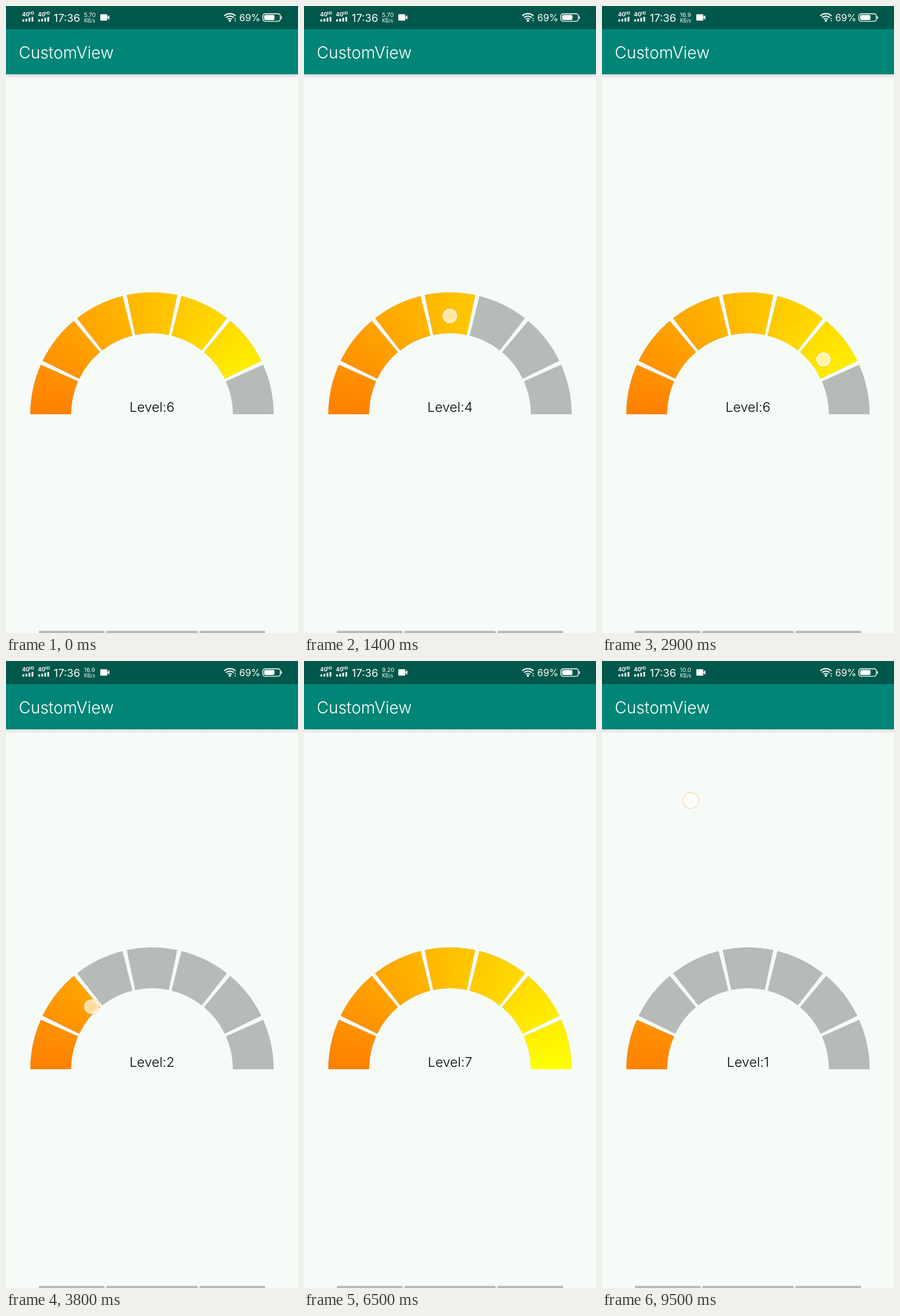
An HTML page that plays this animation: 480 by 1029 pixels, repeating every 9.6 s.

```html
<!DOCTYPE html>
<html lang="en">
<head>
<meta charset="utf-8">
<title>CustomView</title>
<style>
  html, body { margin: 0; width: 100%; height: 100%; overflow: hidden; background: #f6fbf8; }
  #stage { position: relative; width: 480px; height: 1029px; overflow: hidden; }
  svg { position: absolute; left: 0; top: 0; display: block; }
  text { font-family: Inter, Roboto, sans-serif; }
  #lit {
    position: absolute; left: 40px; top: 470px; width: 400px; height: 200px;
    background: conic-gradient(from 270deg at 200px 200px, #ff8000 0deg, #ffff00 180deg, #ff8000 180deg);
  }
</style>
</head>
<body>
<div id="stage">
  <svg width="480" height="1029" viewBox="0 0 480 1029">
    <defs>
      <linearGradient id="shade" x2="0" y2="1">
        <stop offset="0" stop-color="#000" stop-opacity=".13"/>
        <stop offset="1" stop-color="#000" stop-opacity="0"/>
      </linearGradient>
      <g id="signal" fill="#fff">
        <text x="0" y="17" font-size="8.5" font-weight="700">4G</text>
        <text x="11.5" y="14.3" font-size="5.6" font-weight="700">HD</text>
        <path d="M.5 25.5v-3.5h3v3.5zM5.5 25.5v-4.5h3v4.5zM10.5 25.5v-6h3v6zM15.5 25.5v-7.5h3v7.5z"/>
      </g>
    </defs>
    <rect width="480" height="1029" fill="#f6fbf8"/>
    <rect y="112" width="480" height="7" fill="url(#shade)"/>
    <rect y="37" width="480" height="75" fill="#008577"/>
    <rect width="480" height="38" fill="#00574b"/>

    <use href="#signal" x="26.5"/>
    <use href="#signal" x="52.5"/>
    <g fill="#fff">
      <text x="78.5" y="25.8" font-size="17.6">17:36</text>
      <text id="speed" x="128.3" y="18" font-size="9.5"></text>
      <text x="128.3" y="26.6" font-size="8.3">KB/s</text>
      <rect x="155" y="13.5" width="11.5" height="10.5" rx="1"/>
      <path d="M166 18.7l4-3.7v7.5z"/>
      <text x="383.5" y="25" font-size="15.6">69%</text>
      <text x="21" y="86" font-size="26.8" font-weight="300">CustomView</text>
      <circle cx="368" cy="24" r="1.9"/>
      <circle cx="376.6" cy="20.8" r="1"/>
      <circle cx="376.6" cy="24.2" r="1"/>
      <rect x="424.3" y="14.8" width="17" height="8.2" rx="2"/>
      <rect x="452.2" y="16.7" width="1.4" height="4.4" rx=".7"/>
    </g>
    <g fill="none" stroke="#fff">
      <path d="M358.8 16.2a13.2 13.2 0 0 1 18.4 0M361.7 19a9.2 9.2 0 0 1 12.6 0M364.6 21.7a5 5 0 0 1 6.8 0" stroke-width="1.9"/>
      <rect x="422.2" y="12.7" width="28.8" height="12.4" rx="3.8" stroke-width="1.4"/>
    </g>

    <path id="track" fill="#b6bbb7" transform="translate(40 470)"/>
    <text id="label" x="240" y="666" font-size="22" font-weight="300" text-anchor="middle" fill="#000"></text>
    <g fill="#b5bab7">
      <rect x="54" y="1025.5" width="108" height="6" rx="1.5"/>
      <rect x="165" y="1025.5" width="150" height="6" rx="1.5"/>
      <rect x="318" y="1025.5" width="108" height="6" rx="1.5"/>
    </g>
  </svg>

  <div id="lit"></div>

  <svg width="480" height="1029" viewBox="0 0 480 1029">
    <defs>
      <radialGradient id="glow">
        <stop offset="0" stop-color="#fff" stop-opacity=".58"/>
        <stop offset=".4" stop-color="#fff" stop-opacity=".6"/>
        <stop offset=".65" stop-color="#fff" stop-opacity=".7"/>
        <stop offset="1" stop-color="#fff" stop-opacity=".72"/>
      </radialGradient>
    </defs>
    <g id="touch">
      <circle r="12.8" fill="none" stroke="#ffa726" stroke-opacity=".3" stroke-width="1.8"/>
      <circle r="12.2" fill="url(#glow)"/>
    </g>
  </svg>
</div>

<script>
const LOOP = 9600, STEP = 100, COUNT = 7, SWEEP = 24, GAP = 2;
const OUTER = 200, INNER = 133, CENTER = { x: 240, y: 670 };
const TAP_LENGTH = 200;

// time, angle from the left end in degrees, radius
const drag = [
  [300, -4, 160], [600, 0, 158], [900, 19, 156], [1900, 161, 166], [2250, 187, 160],
  [2500, 184, 158], [3800, 46, 143], [4200, 11, 144], [4400, -1, 165]
];
const DRAG_START = 300, DRAG_END = 4600;

// time, x, y
const taps = [
  [4900, 167, 520], [5600, 305, 515], [6300, 426, 632],
  [7200, 167, 504], [7900, 85, 622], [9400, 146, 229]
];

const speeds = [[7900, "10.0"], [4900, "9.20"], [1900, "16.9"], [0, "5.70"]];

const $ = id => document.getElementById(id);
const clamp = (v, lo, hi) => Math.min(hi, Math.max(lo, v));

function polar(angle, radius, cx = CENTER.x, cy = CENTER.y) {
  const a = angle * Math.PI / 180;
  return { x: cx - radius * Math.cos(a), y: cy - radius * Math.sin(a) };
}

function segment(i) {
  const from = i * (SWEEP + GAP), to = from + SWEEP;
  const at = (angle, radius) => {
    const p = polar(angle, radius, OUTER, OUTER);
    return p.x.toFixed(2) + " " + p.y.toFixed(2);
  };
  return `M${at(from, OUTER)}A${OUTER} ${OUTER} 0 0 1 ${at(to, OUTER)}` +
    `L${at(to, INNER)}A${INNER} ${INNER} 0 0 0 ${at(from, INNER)}Z`;
}

const arcs = Array.from({ length: COUNT }, (_, i) => segment(i));
const arcPath = n => arcs.slice(0, n).join("");

// Cubic Hermite curve through the keys, with slopes taken from the neighbours
function follow(keys, t, col) {
  const last = keys.length - 1;
  t = clamp(t, keys[0][0], keys[last][0]);
  let i = 0;
  while (i < last - 1 && t > keys[i + 1][0]) i++;
  const slope = k => {
    const a = keys[Math.max(0, k - 1)], b = keys[Math.min(last, k + 1)];
    return (b[col] - a[col]) / (b[0] - a[0]);
  };
  const [p, q] = [keys[i], keys[i + 1]];
  const span = q[0] - p[0], u = (t - p[0]) / span, v = 1 - u;
  return v * v * (1 + 2 * u) * p[col] + u * u * (1 + 2 * v) * q[col] +
    span * u * v * (v * slope(i) - u * slope(i + 1));
}

const levelOf = angle => clamp(Math.ceil(angle * COUNT / 180), 1, COUNT);

function tapLevel([, x, y]) {
  const dx = CENTER.x - x, dy = CENTER.y - y, r = Math.hypot(dx, dy);
  return r >= INNER && r <= OUTER ? levelOf(Math.atan2(dy, dx) * 180 / Math.PI) : null;
}

function stateAt(t) {
  let level = 6, touch = null;
  if (t >= DRAG_START) {
    const angle = follow(drag, t, 1);
    level = levelOf(angle);
    if (t < DRAG_END) touch = polar(angle, follow(drag, t, 2));
  }
  for (const tap of taps) {
    if (t < tap[0]) break;
    level = tapLevel(tap) ?? level;
    if (t < tap[0] + TAP_LENGTH) touch = { x: tap[1], y: tap[2] };
  }
  return { level, touch };
}

function render(t) {
  const { level, touch } = stateAt(t);
  $("lit").style.clipPath = `path("${arcPath(level)}")`;
  $("label").textContent = "Level:" + level;
  $("speed").textContent = speeds.find(s => t >= s[0])[1];
  $("touch").style.display = touch ? "" : "none";
  if (touch) $("touch").setAttribute("transform", `translate(${touch.x} ${touch.y})`);
}

$("track").setAttribute("d", arcPath(COUNT));

let start = null;
function frame(now) {
  start ??= now;
  const t = (now - start) % LOOP;
  render(Math.floor(t / STEP) * STEP);
  requestAnimationFrame(frame);
}
render(0);
requestAnimationFrame(frame);
</script>
</body>
</html>
```
